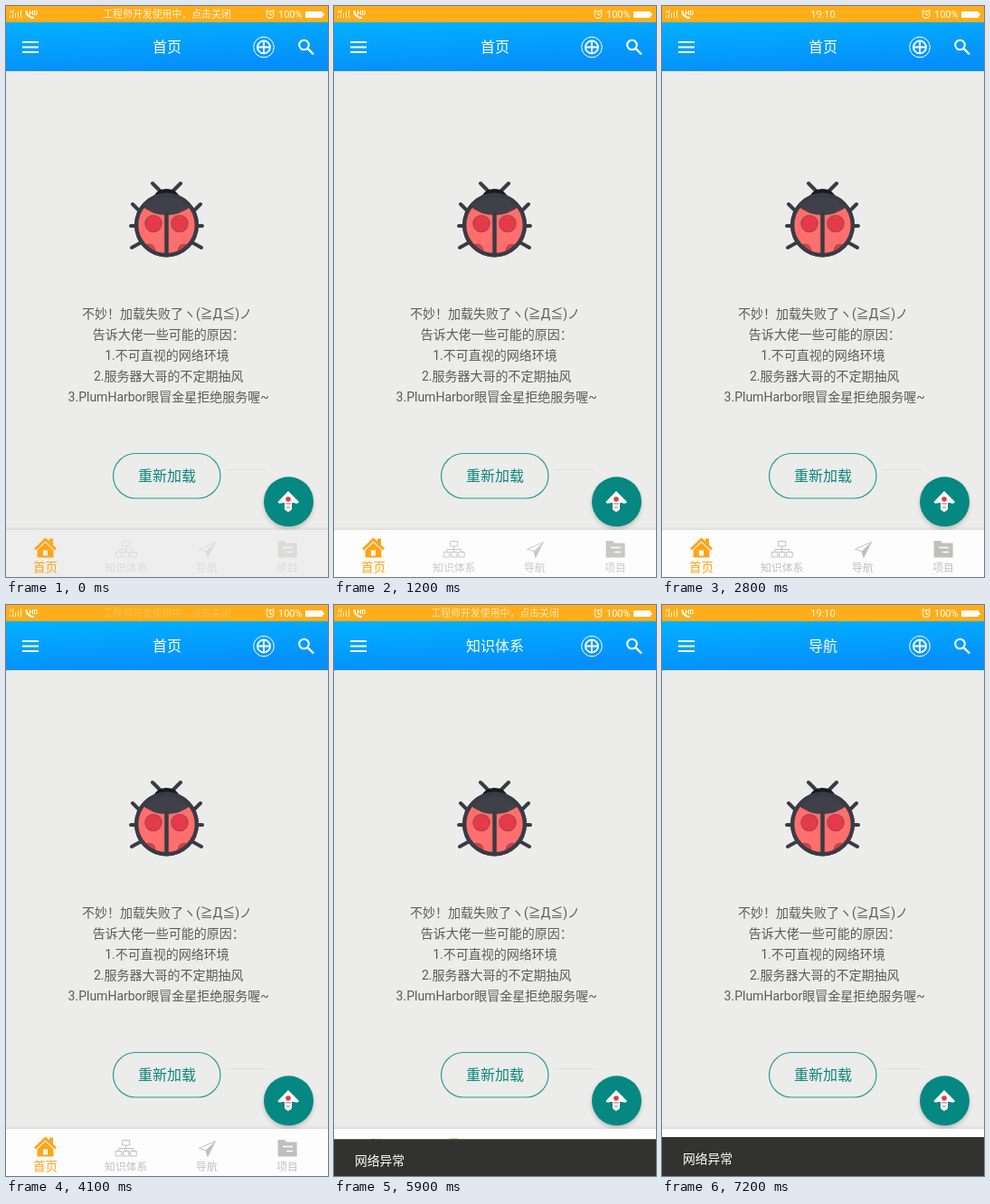
An HTML page for the animation above (8 s loop, 356 px wide and 631 px high).

```html
<!DOCTYPE html>
<html lang="zh-CN">
<head>
<meta charset="utf-8">
<title>加载失败</title>
<style>
  html, body { margin: 0; width: 100%; height: 100%; overflow: hidden; background: #ececea; }
  svg { display: block; width: 100%; height: 100%; }
  text { font-family: Roboto, "Noto Sans CJK SC", "Noto Sans CJK", sans-serif; }
  .mid { text-anchor: middle; }
  .line { fill: none; stroke: currentColor; }
  .white { color: #fff; fill: #fff; }
</style>
</head>
<body>
<svg viewBox="0 0 356 631" preserveAspectRatio="none">
  <defs>
    <linearGradient id="sky" x1="0" y1="0" x2=".3" y2="1">
      <stop stop-color="#02b2fe"/><stop offset="1" stop-color="#058ffb"/>
    </linearGradient>
    <linearGradient id="edge" x1="0" y1="0" x2="0" y2="1">
      <stop stop-color="#000" stop-opacity="0"/><stop offset="1" stop-color="#000" stop-opacity=".07"/>
    </linearGradient>
    <filter id="soft" x="-30%" y="-30%" width="160%" height="160%"><feGaussianBlur stdDeviation="2.5"/></filter>
    <clipPath id="shell"><circle cx="177.500" cy="242" r="34"/></clipPath>
    <clipPath id="navArea"><path d="M0 579H356V631H0Z"/></clipPath>
  </defs>
  <path fill="#ececea" d="M0 0H356V631H0Z"/>

  <!-- status bar -->
  <path fill="#ffae1a" d="M0 0H356V18H0Z"/>
  <g class="white">
    <path class="line" d="M5 4.500V7H8M8 4V8M4.500 13V10.500M7.500 13V9.500M10.500 13V8M13.500 13V6.500M16.500 13V4.500" opacity=".85"/>
    <path class="line" d="M22.500 6Q23 12 30 13" stroke-width="2.200" stroke-linecap="round"/>
    <text x="25.500" y="9.500" font-size="7" font-weight="700">HD</text>
    <circle class="line" cx="292" cy="9.500" r="4"/>
    <path class="line" d="M292 7V10H294M287 6L289.500 4M297 6L294.500 4"/>
    <text x="301" y="13" font-size="11">100%</text>
    <path d="M331 6H350V8H351.500V11H350V13H331Z"/>
    <text id="notice" class="mid" x="178" y="13" font-size="10.900">工程师开发使用中，点击关闭</text>
    <text id="clock" class="mid" x="178" y="13" font-size="11">19:10</text>
  </g>

  <!-- toolbar -->
  <path fill="url(#sky)" d="M0 18H356V72H0Z"/>
  <g class="white">
    <path class="line" d="M18 40H36M18 45.500H36M18 51H36" stroke-width="2"/>
    <text id="title" class="mid" x="178" y="51" font-size="16"></text>
    <circle class="line" cx="285" cy="45.500" r="11.300"/>
    <circle class="line" cx="285" cy="45.500" r="7" stroke-width="1.900"/>
    <path class="line" d="M285 39V52M278.500 45.500H291.500" stroke-width="1.800"/>
    <circle class="line" cx="329.500" cy="43" r="5.300" stroke-width="2"/>
    <path class="line" d="M333.500 47L340 53.500" stroke-width="2.400"/>
  </g>

  <!-- ladybird -->
  <g color="#3b3b45" stroke-linecap="round">
    <g id="half">
      <path class="line" d="M162 196L170 204M140 219L147 226M138 243H145M139 267L148 262" stroke-width="4"/>
    </g>
    <use href="#half" transform="matrix(-1 0 0 1 355 0)"/>
    <path fill="#191922" d="M163 212Q166 202 177.500 202T192 212Z"/>
    <circle cx="177.500" cy="242" r="35.500" fill="#3b3b45"/>
    <g clip-path="url(#shell)">
      <circle cx="177.500" cy="242" r="32" fill="#ff6f6d"/>
      <g id="spots" fill="#e63a4b" stroke="#b9444d" stroke-width="1.700">
        <circle cx="163" cy="240.500" r="9"/>
        <circle cx="158" cy="270" r="6.500" fill="#c9484f"/>
      </g>
      <use href="#spots" transform="matrix(-1 0 0 1 355 0)"/>
      <path fill="#3f4048" d="M150 205H205V221Q193 231 177.500 231T150 221Z"/>
      <path class="line" d="M177.500 230V278" stroke-width="4.500"/>
    </g>
    <circle class="line" cx="177.500" cy="242" r="33.300" stroke-width="4.400"/>
  </g>

  <g id="message" class="mid" font-size="14" fill="#5b5b5a"></g>

  <rect x="118.500" y="494.500" width="118.500" height="49.500" rx="24.750" fill="none" stroke="#259c95" stroke-width="1.200"/>
  <text class="mid" x="178" y="525" font-size="16" fill="#0b857f">重新加载</text>
  <path fill="#e4dce8" d="M243 512H287V513H243Z"/>

  <!-- floating button -->
  <circle cx="312.500" cy="550.500" r="27" fill="#000" opacity=".22" filter="url(#soft)"/>
  <circle cx="312.500" cy="547.800" r="27.500" fill="#058882"/>
  <path fill="#fff" d="M312 536L324 548Q323 551 318 549H316V556Q312 562 308 556V549H306Q301 551 300.500 548Z"/>
  <circle cx="312" cy="545" r="2.800" fill="#d8404a"/>
  <path d="M309 550H315M310 554H314" stroke="#b7686a"/>

  <!-- bottom navigation -->
  <path fill="url(#edge)" d="M0 575H356V579H0Z"/>
  <path id="navBack" d="M0 579H356V631H0Z"/>
  <circle id="ripple" cy="606" opacity=".06" clip-path="url(#navArea)"/>
  <g id="tabs"></g>

  <g id="snackbar">
    <path fill="#323330" d="M0 588H356V640H0Z"/>
    <text x="23" y="617" font-size="13.750" fill="#fff">网络异常</text>
  </g>
</svg>
<script>
const LOOP = 8000, STEP = 100;
const $ = id => document.getElementById(id);

// Some lines carry a leading space, which shifts their centring.
const lines = ["不妙！加载失败了ヽ(≧Д≦)ノ", "\u00a0告诉大佬一些可能的原因：", "1.不可直视的网络环境",
  "\u00a02.服务器大哥的不定期抽风", "\u00a03.PlumHarbor眼冒金星拒绝服务喔~"];
$("message").innerHTML = lines.map((line, i) =>
  `<text x="178" y="${345 + i * 23}">${line}</text>`).join("");

// Icons are drawn around (0, 0).
const tabs = [
  ["首页", `<path fill="currentColor" fill-rule="evenodd" d="M-12.500 1L0 -11L4.500 -7V-10H8.500V-3L12.500 1L10.500 3L0 -7L-10.500 3Z
    M-9 3L0 -5.500L9 3V11H-9ZM-2.500 3V9H2.500V3Z"/>`],
  ["知识体系", `<path class="line" d="M-4 -8.500H4V-3H-4ZM-11.500 3.500H-5V9H-11.500ZM-3.200 3.500H3.200V9H-3.200Z
    M5 3.500H11.500V9H5ZM0 -3V3.500M-8 3.500V.5H8V3.500"/>`],
  ["导航", `<path class="line" d="M9.500 -7.500L-8.500 .5L-1 2.500L1 9.500Z"/>
    <path fill="currentColor" d="M9.500 -7.500L-1 2.500L1 9.500Z"/>`],
  ["项目", `<path fill="currentColor" d="M-10.500 -9H-3L-1 -6.500H10.500V9.500H-10.500Z"/>
    <path d="M-5 -1.500H6M-1 3.500H6" stroke="#fff" stroke-width="1.700"/>`]
];
const tabX = i => 43.5 + i * 89.2;
$("tabs").innerHTML = tabs.map(([label, icon], i) =>
  `<g><g>${icon}</g><text class="mid" x="${tabX(i)}" fill="currentColor">${label}</text></g>`).join("");
const tabNodes = [...$("tabs").children];

// Linear interpolation through [time, value] keys.
function track(keys, t) {
  const next = keys.findIndex(key => key[0] > t);
  if (next < 0) return keys[keys.length - 1][1];
  if (next === 0) return keys[0][1];
  const [t0, v0] = keys[next - 1], [t1, v1] = keys[next];
  return v0 + (v1 - v0) * (t - t0) / (t1 - t0);
}

const noticeKeys = [[400, 1], [900, 0], [4000, 0], [4400, 1], [5800, 1], [6300, 0]];
const clockKeys = [[1300, 0], [1700, 1], [3200, 1], [3600, 0], [6800, 0], [7200, 1]];
const snackKeys = [[4300, 0], [4400, .7], [4500, 1], [5800, 1], [5900, .95], [6000, .3],
  [6100, 0], [6500, 0], [6600, .7], [6700, 1]];
const navKeys = [[400, 0], [700, 1]];
const labelKeys = [[400, .4], [700, .8], [1200, .85], [1700, 1]];
const taps = [[4200, 1], [6400, 2]];

function render(t) {
  $("notice").setAttribute("opacity", .85 * track(noticeKeys, t));
  $("clock").setAttribute("opacity", .9 * track(clockKeys, t));
  $("snackbar").setAttribute("transform", `translate(0 ${44 * (1 - track(snackKeys, t))})`);
  const shade = 238 + 15 * track(navKeys, t);
  $("navBack").setAttribute("fill", `rgb(${shade},${shade},${shade})`);

  const tap = taps.filter(([start]) => t >= start).pop();
  const selected = tap ? tap[1] : 0;
  const age = tap ? t - tap[0] : Infinity;
  $("ripple").setAttribute("cx", tabX(selected) - 1);
  $("ripple").setAttribute("r", age < 400 ? 24 + age * .12 : 0);
  $("title").textContent = tabs[selected][0];

  tabNodes.forEach((node, i) => {
    const active = i === selected;
    const [icon, label] = node.children;
    node.setAttribute("color", active ? "#ffa51a" : "#bfbfbe");
    node.setAttribute("opacity", active ? 1 : track(labelKeys, t));
    icon.setAttribute("transform", `translate(${tabX(i)} ${active ? 598.5 : 600})`);
    label.setAttribute("y", active ? 625 : 624.5);
    label.setAttribute("font-size", active ? 13.6 : 11.8);
  });
}

// The picture advances ten times per second.
function frame() {
  const t = performance.now() % LOOP;
  render(Math.floor(t / STEP) * STEP);
  requestAnimationFrame(frame);
}
frame();
</script>
</body>
</html>
```
